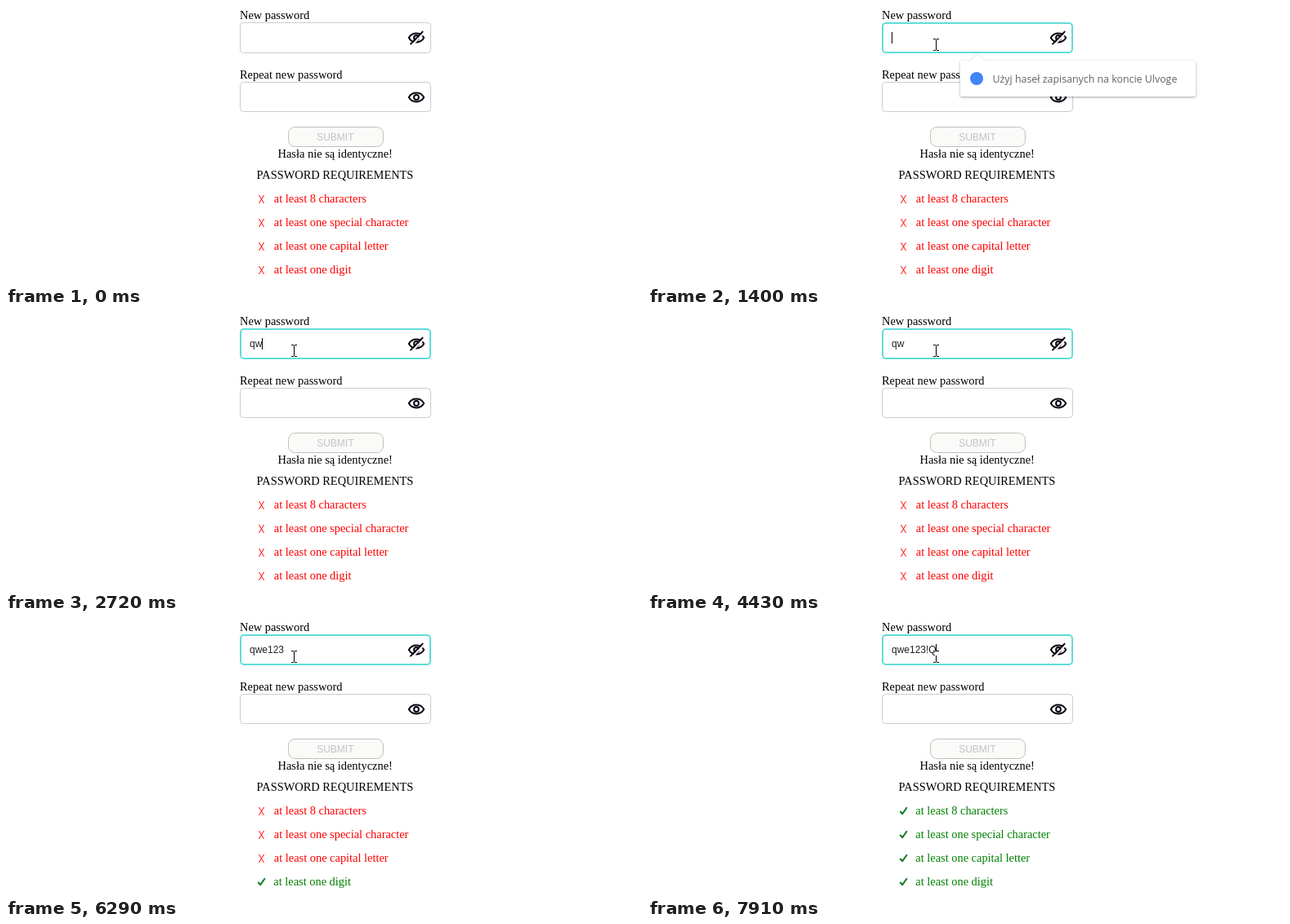
An HTML page that plays this animation: 778x341 px, repeating every 8000 ms.

```html
<!DOCTYPE html>
<html lang="en">
<head>
<meta charset="utf-8">
<title>Password form</title>
<style>
  html, body { margin: 0; width: 100%; height: 100%; overflow: hidden; background: #fff; }
  svg { display: block; }
  text { font: 14.4px "Liberation Serif", "Times New Roman", serif; white-space: pre; }
  .ui { font: 12px "Liberation Sans", Arial, sans-serif; }
  .field { fill: #fff; stroke: #ccc; }
  .icon { fill: none; stroke: #08000f; stroke-width: 2; stroke-linecap: round; stroke-linejoin: round; }
  .row text { fill: #f00; }
  .row path { fill: none; stroke: #f00; }
  .row .tick { stroke: #007a1c; stroke-width: 2; visibility: hidden; }
  .ok text { fill: #008000; transform: translateX(-.5px); }
  .ok .cross { visibility: hidden; }
  .ok .tick { visibility: visible; }
  #hint { filter: drop-shadow(0 1px 1.5px rgba(0, 0, 0, .36)); }
  #hint text { font: 12.4px "Open Sans", sans-serif; fill: #5f6368; }
  #beam { fill: #fff; mix-blend-mode: difference; }
</style>
</head>
<body>
<svg width="778" height="341" viewBox="0 0 778 341">
  <defs>
    <g id="eye">
      <path d="M-9.2 0C-5.2 -7.2 5.2 -7.2 9.2 0C5.2 7.2 -5.2 7.2 -9.2 0Z"/>
      <circle r="2.9"/>
    </g>
  </defs>
  <rect width="778" height="341" fill="#fff"/>

  <text x="286" y="16">New password</text>
  <rect id="first" class="field" rx="4"/>
  <text id="typed" class="ui" x="298" y="43" fill="#222"></text>
  <rect id="caret" y="32" width="1" height="14"/>
  <g class="icon" transform="translate(502 39)">
    <use href="#eye"/>
    <path d="M-5.4 9L9.4 -6" stroke="#fff"/>
    <path d="M-7 7.6L7.6 -7.4"/>
  </g>

  <text x="286" y="89">Repeat new password</text>
  <rect class="field" x="286.5" y="93.5" width="233" height="36" rx="4"/>
  <g class="icon" transform="translate(502 112)"><use href="#eye"/></g>

  <rect x="345.5" y="148.5" width="116" height="24" rx="8" fill="#fafaf9" stroke="#bfc0b8"/>
  <text class="ui" x="380.2" y="165" fill="#c3c3c3">SUBMIT</text>
  <text x="332.6" y="186">Hasła nie są identyczne!</text>
  <text x="306.6" y="212">PASSWORD REQUIREMENTS</text>
  <g id="rules"></g>

  <g id="hint">
    <path d="M384 67H394.500L403 59L411.500 67H668Q670 67 670 69V109Q670 111 668 111H384Q382 111 382 109V69Q382 67 384 67Z" fill="#fff"/>
    <circle cx="402" cy="89" r="8" fill="#4285f4"/>
    <text x="421.500" y="94">Użyj haseł zapisanych na koncie Ulvoge</text>
  </g>

  <path id="arrow" d="M.5 .5V16.500L4.200 13L6.700 18.500L9 17.500L6.600 12H11.500Z" fill="#fff" stroke="#000"/>
  <path id="beam" shape-rendering="crispEdges" d="M-3 -7h3v1h-3zM1 -7h3v1h-3zM0 -6h1v13h-1zM-3 7h3v1h-3zM1 7h3v1h-3z"/>
</svg>
<script>
const LOOP = 8000;
const $ = id => document.getElementById(id);

// Label and the time at which the rule is met
const rules = [
  ['at least 8 characters', 7910],
  ['at least one special character', 6910],
  ['at least one capital letter', 7910],
  ['at least one digit', 5510]
];

// Time, field content, caret position
const typing = [
  [0, '', 298], [2550, 'q', 304], [2720, 'qw', 313], [2810, 'qww', 321],
  [3570, 'qw', 313], [4730, 'qwe', 320], [5450, 'qwe1', 326], [5510, 'qwe12', 333],
  [5740, 'qwe123', 340], [6840, 'qwe123!', 343], [7840, 'qwe123!Q', 352]
];

// The caret switches on and off in turn
const blinks = [1160, 1770, 2320, 3400, 3880, 4430, 4730, 5280, 5450, 6290, 6840, 7380, 7840];

$('rules').innerHTML = rules.map(([label], i) => `
  <g class="row" transform="translate(0 ${241 + 29 * i})">
    <path class="cross" d="M309.500 -9L315.500 1M315.500 -9L309.500 1"/>
    <path class="tick" d="M308.300 -4L311.200 -.8L316.800 -8.800"/>
    <text x="327.800">${label}</text>
  </g>`).join('');
const rows = document.querySelectorAll('.row');

const show = (el, on) => el.setAttribute('visibility', on ? 'visible' : 'hidden');
const place = (el, x, y) => el.setAttribute('transform', `translate(${x} ${y})`);

function drawField(t) {
  const focused = t >= 1160, inset = focused ? 1 : .5;
  const attrs = { x: 286 + inset, y: 20 + inset, width: 234 - 2 * inset, height: 38 - 2 * inset };
  for (const key in attrs) $('first').setAttribute(key, attrs[key]);
  $('first').style.strokeWidth = 2 * inset;
  $('first').style.stroke = !focused ? '#ccc' : t < 1250 ? '#92d6d3' : '#61dcd8';

  const [, text, x] = typing.filter(e => e[0] <= t).pop();
  if ($('typed').textContent !== text) $('typed').textContent = text;
  $('caret').setAttribute('x', x);
  show($('caret'), blinks.filter(b => b <= t).length % 2);
}

// The pointer glides in with a few visible steps, slowing down at the field
function drawPointer(t) {
  const p = Math.min(7, Math.floor((t - 390) / 77)) / 7;
  const ease = 1 - (1 - p) ** 2;
  const x = Math.round(593 - 241 * ease), y = Math.round(245 - 198 * ease);
  const inField = x < 520 && (y >= 20 && y < 58 || y >= 93 && y < 130);
  place($('arrow'), x, y);
  place($('beam'), x, y);
  show($('arrow'), t >= 390 && !inField);
  show($('beam'), t >= 390 && inField);
}

function draw(t) {
  drawField(t);
  drawPointer(t);
  show($('hint'), t >= 1400 && t < 2630);
  rows.forEach((row, i) => row.classList.toggle('ok', t >= rules[i][1]));
}

const start = performance.now();
function tick() {
  draw((performance.now() - start) % LOOP);
  requestAnimationFrame(tick);
}
tick();
</script>
</body>
</html>
```
